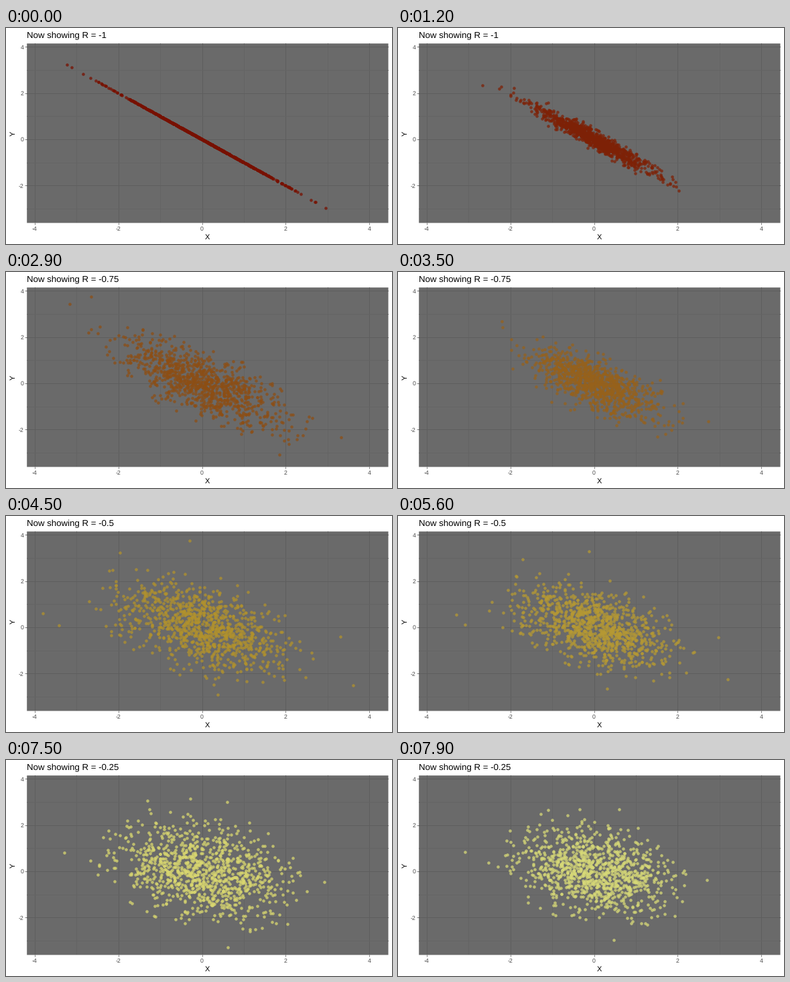
Write a matplotlib script that moves like this. It is 576 by 324 pixels and loops after 8 s.

```python
import numpy as np
import matplotlib.pyplot as plt
from matplotlib.animation import FuncAnimation

W, H, DPI = 576, 324, 72
LEFT, RIGHT, TOP, BOTTOM = 31.2, 570.5, 23.25, 292.4
X0, Y0, SX, SY = 292.5, 167.0, 62.4, 34.65   # pixel origin and pixels per unit
COUNT = 1000
HOLD, MOVE, FIRST = 6, 17, 5                 # frames at rest, in motion, before moving

# correlation, dot colour, a few far points that set the outline
STATES = [
    (-1, (120, 16, 0), [(-3.23, 3.23), (-3.11, 3.11), (-2.84, 2.84), (2.96, -2.96)]),
    (-0.75, (141, 78, 20), [(-3.17, 3.45), (-2.65, 3.75), (3.33, -2.35), (1.85, -3.1)]),
    (-0.5, (178, 146, 44), [(-3.8, 0.6), (-3.42, 0.1), (-1.97, 3.22), (-0.29, 3.75),
                            (3.31, -0.4), (3.62, -2.5), (0.37, -2.92)]),
    (-0.25, (218, 216, 112), [(-3.3, 0.8), (-1.3, 3.05), (-0.28, 3.15), (0.6, 3.0),
                              (2.92, -0.45), (0.62, -3.3)]),
    (0, (194, 234, 190), []),
]

rng = np.random.default_rng(12)


def cloud(r, far):
    """Correlated normal sample without its rim, plus the far points."""
    z = rng.standard_normal((2 * COUNT, 2))
    x, e = z[np.hypot(*z.T) < 2.75][:COUNT - len(far)].T
    pts = np.column_stack([x, r * x + np.sqrt(1 - r * r) * e])
    return rng.permutation(np.vstack([pts, np.reshape(far, (-1, 2))]))


def ease(t):
    """Cubic in and out."""
    return 4 * t ** 3 if t < 0.5 else 1 - 4 * (1 - t) ** 3


clouds = [cloud(r, far) for r, _, far in STATES]
colors = [np.array(c) / 255 for _, c, _ in STATES]

plt.rcParams["font.family"] = "Liberation Sans"
plt.rcParams["text.hinting"] = "none"
fig = plt.figure(figsize=(W / DPI, H / DPI), dpi=DPI, facecolor="white")
ax = fig.add_axes([LEFT / W, 1 - BOTTOM / H, (RIGHT - LEFT) / W, (BOTTOM - TOP) / H])
ax.set_facecolor("#6a6a6a")
ax.patch.set_snap(False)
ax.set_xlim((LEFT - X0) / SX, (RIGHT - X0) / SX)
ax.set_ylim((Y0 - BOTTOM) / SY, (Y0 - TOP) / SY)
ax.spines[:].set_visible(False)
ax.set_axisbelow(True)
for axis, low in ((ax.xaxis, -4), (ax.yaxis, -2)):
    major = range(low, 5, 2)
    axis.set_ticks(major, [str(v) for v in major])
    axis.set_ticks([-3, -1, 1, 3], minor=True)
ax.grid(which="major", color="#5e5e5e", lw=1)
ax.grid(which="minor", color="#646464", lw=1)
ax.tick_params(which="major", length=2.75, width=0.6, pad=2.2, color="#333333",
               labelsize=8.8, labelcolor="#4d4d4d")
ax.tick_params(which="minor", length=0)

title = fig.text(LEFT / W, 1 - 15 / H, "", fontsize=13.2, va="baseline")
fig.text(300.8 / W, 1 - 317 / H, "X", fontsize=11, ha="center", va="baseline")
fig.text(16 / W, 1 - 158 / H, "Y", fontsize=11, rotation=90,
         ha="right", va="center")
dots = ax.scatter(*clouds[0].T, s=4.6 ** 2, linewidths=0, alpha=0.75, zorder=3)


def draw(i):
    s, step = divmod(max(i - FIRST, 0), HOLD + MOVE)
    t = min(step / MOVE, 1)
    k = ease(t)
    dots.set_offsets((1 - k) * clouds[s] + k * clouds[s + 1])
    dots.set_facecolor((1 - k) * colors[s] + k * colors[s + 1])
    shown = STATES[s + (t > 0.55)][0]
    title.set_text(f"Now showing R = {shown}")
    return dots, title


anim = FuncAnimation(fig, draw, frames=80, interval=100, repeat=True,
                     repeat_delay=0, blit=False)
plt.show()
```
